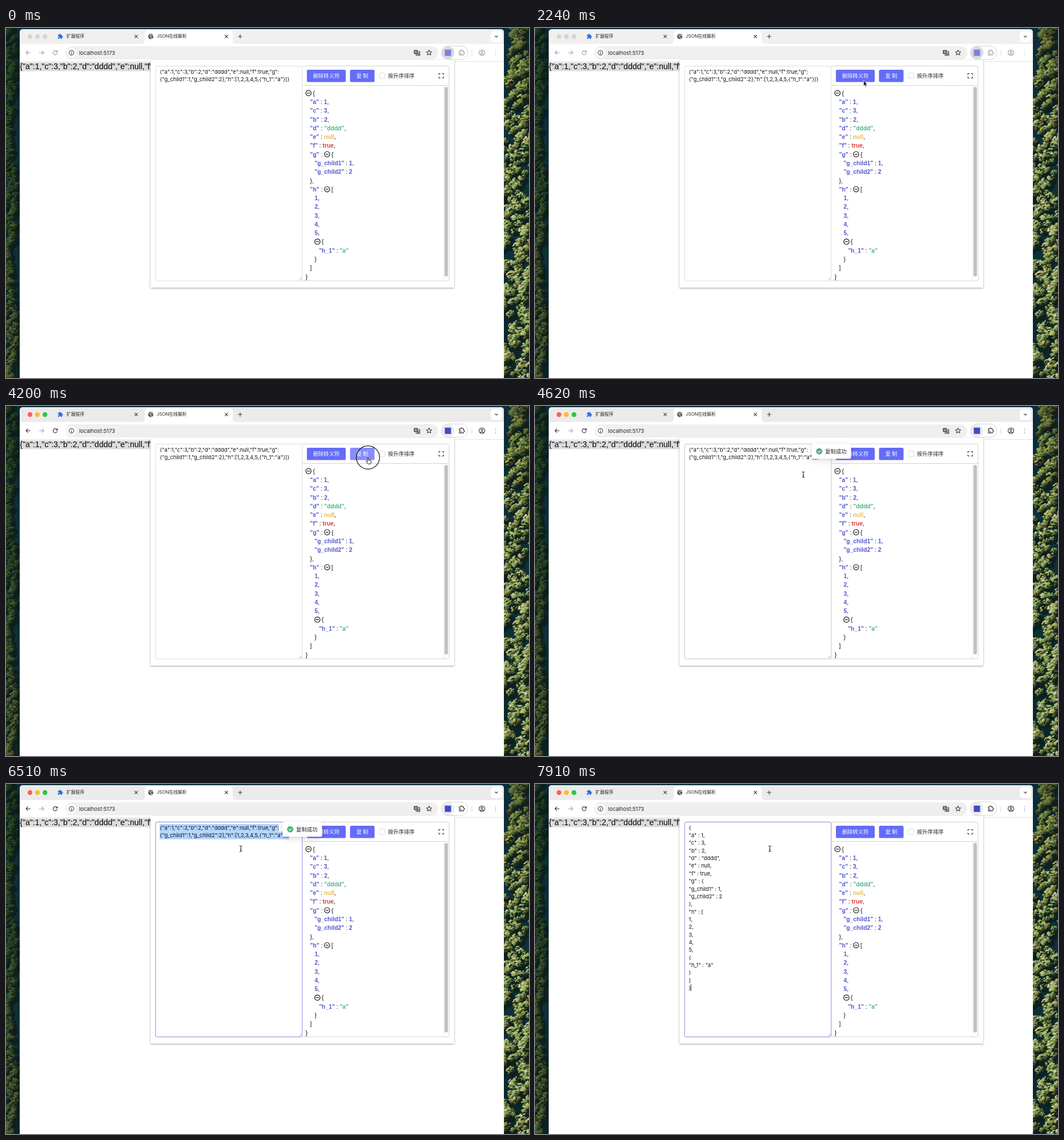
An HTML page with a canvas that plays this animation: 916x612 px, repeating every 8 s.

```html
<!DOCTYPE html>
<html lang="zh">
<head>
<meta charset="utf-8">
<title>JSON</title>
<style>
html, body { margin: 0; width: 100%; height: 100%; overflow: hidden; background: #10292c; }
canvas, svg { position: absolute; left: 0; top: 0; width: 916px; height: 612px; display: block; }
text { white-space: pre; }
.ui { font-family: Inter, "Noto Sans CJK SC", "Noto Sans CJK", sans-serif; }
.cjk { font: 500 9.3px "Noto Sans CJK SC", "Noto Sans CJK", sans-serif; }
.plain { font-weight: 400; fill: #222; }
.tab { font-size: 7.8px; fill: #222; }
.area { font-size: 9.3px; fill: #111; }
.tree { font: 10.35px "Liberation Sans", Arial, sans-serif; fill: #111; }
.page { font: 14.05px "Liberation Sans", Arial, sans-serif; }
.key, .num, .str, .nil, .yes { font-weight: bold; }
.key, .num { fill: #5558d2; }
.str { fill: #4fb783; }
.nil { fill: #eabb54; }
.yes { fill: #d8403c; }
.line { fill: none; stroke: #3a3a3c; stroke-width: 1.1; stroke-linecap: round; stroke-linejoin: round; }
#popup { filter: drop-shadow(0 1px 1.5px rgba(0,0,0,.38)); }
#toastBox { filter: drop-shadow(0 1px 2px rgba(0,0,0,.1)) drop-shadow(0 4px 6px rgba(0,0,0,.1)); }
</style>
</head>
<body>
<canvas id="forest" width="916" height="612"></canvas>
<svg viewBox="0 0 916 612">
  <defs>
    <path id="puzzle" d="M20.5 11H19V7c0-1.1-.9-2-2-2h-4V3.5a2.5 2.5 0 0 0-5 0V5H4c-1.1 0-2 .9-2 2v3.8h1.5a2.7 2.7 0 0 1 0 5.4H2V20c0 1.1.9 2 2 2h3.8v-1.5a2.7 2.7 0 0 1 5.4 0V22H17c1.1 0 2-.9 2-2v-4h1.5a2.5 2.5 0 0 0 0-5z"/>
    <path id="cross" class="line" d="M-2.4-2.4 2.4 2.4M2.4-2.4-2.4 2.4"/>
    <g id="fold" fill="none" stroke="#111" stroke-width="1.1"><circle r="4.7"/><path d="M-2.7 0H2.7"/></g>
  </defs>

  <!-- browser window -->
  <path d="M24 612V8q0-6 6-6H866q6 0 6 6V612z" fill="#fff"/>
  <path id="strip" d="M24 28V8q0-6 6-6H866q6 0 6 6V28z"/>
  <path d="M237 28q6 0 6-6V10q0-6 6-6H391q6 0 6 6V22q0 6 6 6z" fill="#fff"/>
  <path d="M24 58.5H872" stroke="#e3e3e3"/>
  <g id="lights"><circle cx="42" cy="15" r="4.2"/><circle cx="55" cy="15" r="4.2"/><circle cx="68.3" cy="15" r="4.2"/></g>
  <use href="#puzzle" transform="translate(90 9.6) scale(.43)" fill="#2f6fe0"/>
  <text class="ui tab" x="106" y="17.4">扩展程序</text>
  <use href="#cross" x="228" y="14.8"/>
  <circle cx="253.5" cy="14.8" r="4.6" fill="#505357"/>
  <path d="M250.3 13.2l2.6 1.2.6 2 1.4.6-.6 1.8M254 10.8l-.6 1.6 2 1.2 2.2-.4" fill="none" stroke="#fff" stroke-width="1"/>
  <text class="ui tab" x="264" y="17.4">JSON在线解析</text>
  <use href="#cross" x="386" y="14.8"/>
  <path class="line" d="M406.8 14.8h6.6M410.1 11.5v6.6"/>
  <rect x="849" y="5.5" width="19.5" height="19" rx="5" fill="#fff"/>
  <path class="line" d="M856.6 13.8l2.2 2.2 2.2-2.2"/>

  <rect x="104" y="32" width="653" height="23" rx="11.5" fill="#f0eff0"/>
  <circle cx="114.7" cy="43.3" r="8.4" fill="#fff"/>
  <circle class="line" cx="114.7" cy="43.3" r="4.1"/>
  <path class="line" d="M114.7 43v2.2M114.7 41.2v.1"/>
  <text class="ui" x="128" y="46.6" font-size="9.4" fill="#222">localhost:5173</text>
  <rect x="714.3" y="38.5" width="7" height="7" rx="1" fill="#55585c"/>
  <path d="M716 42h3.6M717.8 40.3v3.4" stroke="#fff" stroke-width=".8"/>
  <path class="line" d="M722 41h2.7v7h-6.4v-1.6M720.6 46h3M722.8 43.2l-1.6 3.6" stroke-width=".9"/>
  <path class="line" d="M741 38.5l1.35 3 3.25.3-2.45 2.15.75 3.2-2.9-1.7-2.9 1.7.75-3.2-2.45-2.15 3.25-.3z"/>
  <rect x="762.5" y="31.5" width="46.5" height="23.5" rx="11.75" fill="#fff" stroke="#d5d5d8"/>
  <circle id="extHalo" cx="774.2" cy="43.2" r="11"/>
  <rect id="ext" x="768.5" y="37.8" width="11" height="11"/>
  <path d="M58.5 43.2h7.4M63 40l3.2 3.2-3.2 3.2" class="line" style="stroke:#a5a5a8"/>
  <path d="M816 38.5v9.5" stroke="#d4d4d8"/>
  <g id="tools" class="line">
    <path d="M42.4 43.2h-7.4M38.2 40l-3.2 3.2 3.2 3.2"/>
    <path d="M89.4 41.6a3.6 3.6 0 1 0 .3 2.4M90 39.2v2.8h-2.8"/>
    <use href="#puzzle" transform="translate(793 37.6) scale(.45)" stroke-width="2.4"/>
    <circle cx="833.6" cy="43.2" r="5"/><circle cx="833.6" cy="41.8" r="1.6"/>
    <path d="M830.3 46.7q3.3-2.6 6.6 0M857.6 39.5v.1M857.6 43.2v.1M857.6 46.9v.1"/>
  </g>

  <rect x="24" y="60" width="640" height="15.5" fill="#dcdcdc"/>
  <text id="pageText" class="page" x="24.3" y="72.3"></text>

  <!-- extension popup -->
  <rect id="popup" x="253" y="56" width="532" height="398" fill="#fff"/>
  <rect id="area" x="262" y="66.5" width="256.8" height="375.7" rx="2.5" fill="#fff"/>
  <path d="M513.5 440.5l4-4M516 440.5l1.5-1.5" stroke="#888" stroke-width=".7"/>
  <g id="sel" fill="#b3d4fc"></g>
  <g id="raw" class="ui area"></g>
  <g id="pretty" class="ui area"></g>
  <rect id="caret" x="272.6" y="350" width=".9" height="12" fill="#111"/>

  <path d="M519.5 66.5H774q2 0 2 2V440q0 2-2 2H519.5M519.5 100.5H776" fill="none" stroke="#d3d4d8"/>
  <path d="M766.5 101V442" stroke="#e6e6e6"/>
  <rect x="768" y="103" width="6" height="331.5" rx="3" fill="#c1c1c1"/>
  <g class="cjk" text-anchor="middle">
    <rect x="527" y="73" width="68" height="21.5" rx="2.6" fill="#646cf7"/>
    <text x="561" y="87.2" fill="#fff">删除转义符</text>
    <rect id="copy" x="602.5" y="73" width="43" height="21.5" rx="2.6"/>
    <text x="624" y="87.2" fill="#fff">复 制</text>
  </g>
  <rect x="653.9" y="78.6" width="9.6" height="9.6" rx="1.5" fill="#fff" stroke="#d9dbe2" stroke-width=".9"/>
  <text class="cjk plain" x="669" y="87">按升序排序</text>
  <path d="M758.2 82v-2.5h2.5M763.8 79.5h2.5V82M766.3 85v2.5h-2.5M760.7 87.5h-2.5V85" fill="none" stroke="#222"/>
  <g id="tree" class="tree"></g>

  <g id="toast">
    <rect id="toastBox" x="484.5" y="66" width="69" height="26.3" rx="2" fill="#fff"/>
    <circle cx="497.8" cy="79.2" r="5.5" fill="#4fb07e"/>
    <path d="M495.3 79.3l1.8 1.8 3.3-3.5" fill="none" stroke="#fff" stroke-width="1.1"/>
    <text class="cjk plain" x="508.3" y="82.6">复制成功</text>
  </g>

  <!-- pointer -->
  <g id="pointer">
    <circle id="ring" fill="none" stroke="#0c0c0c" stroke-width="1.2"/>
    <path id="arrow" d="M0 0V9.4L2.2 7.4 3.6 10.7 5.3 10 3.9 6.8H6.7z" fill="#000" stroke="#fff" stroke-width=".7"/>
    <path id="hand" d="M-1 1.7a1 1 0 0 1 2 0v3l3.6.7q1.2.3 1.1 1.5l-.5 2.7-.7 1.6h-4.7l-2.8-3.7q-.5-1 .6-1.2l1.4 1z" fill="#fff" stroke="#000" stroke-width=".9"/>
    <path id="beam" d="M-2.3-5Q0-5 0-3.6 0-5 2.3-5M0-4V4M-2.3 5Q0 5 0 3.6 0 5 2.3 5M-1.2 1.5H1.2" fill="none" stroke="#111" stroke-width=".95"/>
  </g>
</svg>
<script>
const $ = id => document.getElementById(id);
const add = (parent, tag, attrs, text = '') => {
  const el = document.createElementNS('http://www.w3.org/2000/svg', tag);
  for (const k in attrs) el.setAttribute(k, attrs[k]);
  el.textContent = text;
  return parent.appendChild(el);
};

// level, key, value, class, tail
const rows = [
  [0, '', '{'],
  [1, 'a', '1', 'num', ','],
  [1, 'c', '3', 'num', ','],
  [1, 'b', '2', 'num', ','],
  [1, 'd', '"dddd"', 'str', ','],
  [1, 'e', 'null', 'nil', ','],
  [1, 'f', 'true', 'yes', ','],
  [1, 'g', '{'],
  [2, 'g_child1', '1', 'num', ','],
  [2, 'g_child2', '2', 'num'],
  [1, '', '}', '', ','],
  [1, 'h', '['],
  ...[1, 2, 3, 4, 5].map(n => [2, '', String(n), 'num', ',']),
  [2, '', '{'],
  [3, 'h_1', '"a"', 'str'],
  [2, '', '}'],
  [1, '', ']'],
  [0, '', '}']
];
const join = ([, key, value, , tail = ''], colon) => (key ? `"${key}"${colon}` : '') + value + tail;

function buildTexts() {
  const raw = rows.map(r => join(r, ':')).join('');
  const cut = raw.indexOf('"g":') + 4;
  $('pageText').textContent = raw;
  [raw.slice(0, cut), raw.slice(cut)].forEach((s, i) =>
    add($('raw'), 'text', { x: 269.3, y: 79.7 + 13.35 * i }, s));

  rows.forEach((row, i) => {
    const [level, key, value, cls = '', tail = ''] = row;
    add($('pretty'), 'text', { x: 269.3, y: 79.7 + 13.35 * i }, join(row, ' : '));

    let x = 524.8 + 7.8 * level;
    const mid = 114 + 15.28 * i, y = mid + 3.7;
    const line = add($('tree'), 'text', { x, y });
    if (key) {
      add(line, 'tspan', { class: 'key' }, `"${key}"`);
      add(line, 'tspan', {}, ' : ');
    }
    if ('{['.includes(value)) {
      x += key ? line.getComputedTextLength() : 0;
      add($('tree'), 'use', { href: '#fold', x: x + 5, y: mid - .2 });
      add($('tree'), 'text', { x: x + 12.6, y }, value);
    } else {
      add(line, 'tspan', { class: cls }, value);
      add(line, 'tspan', {}, tail);
    }
  });
  add($('sel'), 'rect', { x: 269, y: 70, width: 209, height: 13.4 });
  add($('sel'), 'rect', { x: 269, y: 83.3, width: 226.5, height: 13.4 });
}

// aerial woodland beside dark water, seen at both edges of the window
function paintForest() {
  const g = $('forest').getContext('2d');
  let seed = 11;
  const rnd = () => (seed = seed * 16807 % 2147483647) / 2147483647;
  const blob = (x, y, rx, ry, color) => {
    g.fillStyle = color;
    g.beginPath();
    g.ellipse(x, y, rx, ry, -.5, 0, 7);
    g.fill();
  };
  // crowns are lit from the upper left and throw their shade to the lower right
  const crown = (x, y, r, hue, sat, light) => {
    blob(x + r * .5, y + r * .5, r * 1.1, r * .9, '#0a2023');
    for (let i = 0; i < 34; i++) {
      const a = rnd() * 6.28, d = Math.sqrt(rnd()) * r;
      const dx = Math.cos(a) * d, dy = Math.sin(a) * d;
      const lit = .55 - .45 * (dx + dy) / r + .25 * (rnd() - .5);
      blob(x + dx, y + dy, r * .24, r * .13, `hsl(${hue} ${sat}% ${Math.max(9, light * lit)}%)`);
    }
  };
  const water = g.createLinearGradient(0, 0, 0, 612);
  water.addColorStop(0, '#0b2c38');
  water.addColorStop(.6, '#0e3239');
  water.addColorStop(1, '#0b2425');
  g.fillStyle = water;
  g.fillRect(0, 0, 916, 612);

  for (let y = -6; y < 622; y += 2.6) {
    const k = Math.max(0, y / 612);
    const shore = 15 + 6 * Math.sin(y / 37);
    crown(rnd() * shore, y, 4 + 4 * rnd(), 125 - 35 * k - 15 * rnd(), 30, 21 + 12 * k);
    const bank = 886 - 20 * Math.min(1, k * 3);
    crown(bank + rnd() * (920 - bank), y, 5 + 6 * rnd(), 62 + 22 * rnd(), 34, 34 + 28 * Math.min(1, k * 3));
  }
}

const LOOP = 8000, STEP = 70;
const path = [
  [630, 443, 597], [700, 478, 500], [770, 545, 330], [840, 598, 215], [910, 613, 184],
  [1610, 613, 184], [1820, 588, 158], [2030, 546, 108], [2100, 541, 98], [2170, 552, 93],
  [2240, 575.5, 92], [2310, 600, 90], [2450, 629, 90], [3010, 645, 92], [3220, 645, 92],
  [3290, 647, 92.5], [3500, 647, 92.5], [3780, 634, 90], [4270, 634, 90], [4410, 598, 104],
  [4620, 470, 120], [4760, 425, 117], [5040, 420.5, 116], [5390, 420.5, 116], [5530, 411.3, 113.2]
];
// start, then one radius per step
const rings = [
  [3290, 14.5, 14.5], [3990, 9, 13.5, 17, 20.3], [4830, 9, 13.5, 17], [5180, 11, 15.5]
];
const lightColors = ['#ff5f57', '#febc2e', '#28c840'];

function pointerAt(t) {
  const i = path.findIndex(p => p[0] > t);
  if (i < 0) return path[path.length - 1].slice(1);
  const [t0, x0, y0] = path[Math.max(0, i - 1)], [t1, x1, y1] = path[i];
  const k = Math.max(0, (t - t0) / (t1 - t0 || 1));
  return [x0 + (x1 - x0) * k, y0 + (y1 - y0) * k];
}
const ringAt = t => {
  for (const [start, ...sizes] of rings) {
    const r = sizes[Math.floor((t - start) / STEP)];
    if (t >= start && r) return r;
  }
  return 0;
};
const ramp = (t, from, to) => Math.min(1, Math.max(0, (t - from) / (to - from)));
const show = (id, on) => $(id).style.display = on ? '' : 'none';

function render(time) {
  const t = Math.floor(time / STEP) * STEP;
  const active = t >= 3290, pasted = t >= 6860;

  $('strip').style.fill = active ? '#ebebeb' : '#f1f0ef';
  [...$('lights').children].forEach((c, i) => c.style.fill = active ? lightColors[i] : '#d5d5d5');
  $('tools').style.stroke = active ? '#303134' : '#9b9ca0';
  $('ext').style.fill = active ? '#414bc0' : '#7b82d8';
  $('extHalo').style.fill = active ? '#ececee' : '#d9d9dc';

  $('copy').style.fill = t >= 3640 && t < 4340 ? '#878dfa' : '#646cf7';
  $('area').style.stroke = t >= 4830 ? '#8588dd' : t >= 4620 ? '#c0c4cc' : '#dcdde2';

  show('raw', !pasted);
  show('pretty', pasted);
  show('caret', pasted && (t < 7350 || t >= 7910));
  show('sel', t >= 5180 && !pasted);
  const [first, last] = $('sel').children, all = t >= 5250;
  first.style.display = all ? '' : 'none';
  last.setAttribute('x', all ? 269 : 491.5);
  last.setAttribute('width', all ? 226.5 : 4);

  const toast = ramp(t, 4200, 4410) * (1 - ramp(t, 6580, 6790));
  $('toast').style.opacity = toast;
  $('toast').setAttribute('transform', `translate(0 ${-12 * (1 - toast)})`);

  const [x, y] = pointerAt(t), r = ringAt(t);
  const hand = t >= 3640 && t < 4340, beam = t >= 4620;
  show('pointer', t >= 630);
  $('pointer').setAttribute('transform', `translate(${x} ${y})`);
  show('hand', hand);
  show('beam', beam);
  show('arrow', !hand && !beam);
  show('ring', r);
  $('ring').setAttribute('r', r);
}

buildTexts();
paintForest();
let start;
function tick(now) {
  start ??= now;
  render((now - start) % LOOP);
  requestAnimationFrame(tick);
}
render(0);
requestAnimationFrame(tick);
</script>
</body>
</html>
```
